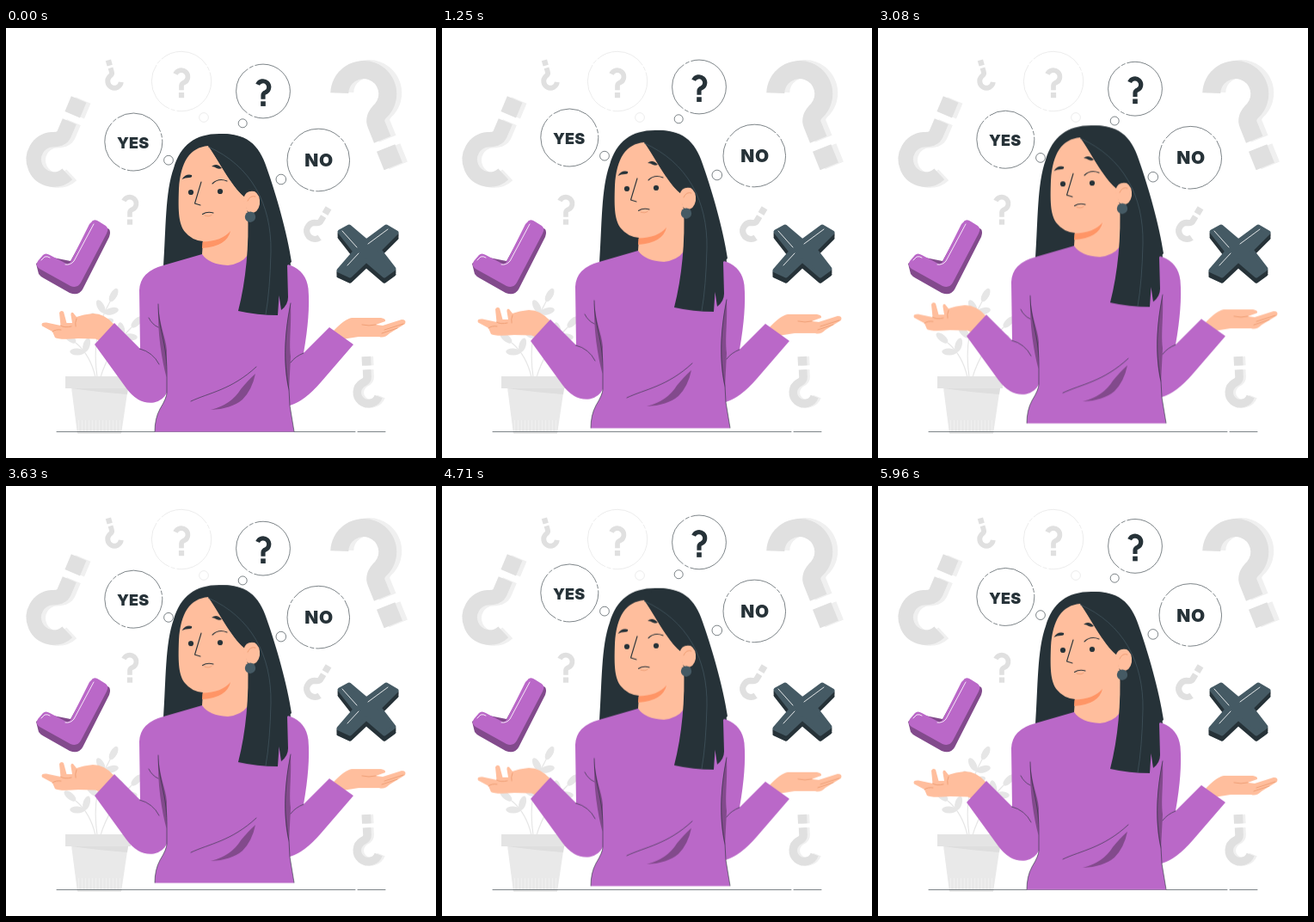
Recreate the animation shown at these times as an HTML page. Size 500 by 500 pixels, loop 6 s.

```html
<!DOCTYPE html>
<html lang="en">
<head>
<meta charset="utf-8">
<title>Yes or no</title>
<style>
  html, body { margin: 0; width: 100%; height: 100%; overflow: hidden; background: #fff; }
  svg { display: block; width: 100vw; height: 100vh; }
  .woman { animation: float 6s linear infinite; }
  .bubbles { animation: bob 6s linear infinite; }
  @keyframes float { 50% { transform: translateY(-10px); } }
  /* half a second of rest, then 3 s swings, cut off by the loop */
  @keyframes bob {
    0%, 8.3333%, 58.3333% { transform: translateY(0); }
    33.3333%, 83.3333% { transform: translateY(-10px); }
    100% { transform: translateY(-3.333px); }
  }
  .ink { fill: #263238; }
  .slate { fill: #455a64; }
  .purple { fill: #ba68c8; }
  .shade { fill: #824a8c; }
  .skin { fill: #ffbe9d; }
  .line { fill: none; stroke: #263238; stroke-width: .6; stroke-linecap: round; stroke-linejoin: round; }
  .feature { stroke-width: 1.1; }
  .crease { fill: none; stroke: #eb996e; stroke-width: .8; stroke-linecap: round; }
  .shine { fill: none; stroke: #fff; stroke-width: 1; stroke-linecap: round; opacity: .85; }
  .ring { fill: #fff; stroke: #263238; stroke-width: .6; stroke-dasharray: 60 2 5 2; }
  .dot { fill: #fff; stroke: #263238; stroke-width: .6; }
  .faint { stroke: #e0e0e0; }
  .grey { color: #e0e0e0; }
  .pale { color: #f0f0f0; }
  .leaf { fill: #e6e6e6; }
  .stems { fill: none; stroke: #e6e6e6; stroke-width: 1.2; }
  text { font: 900 18px Inter, "Open Sans", sans-serif; letter-spacing: .2px; text-anchor: middle; fill: #263238; }
  .large { font-size: 20.8px; letter-spacing: .6px; }
</style>
</head>
<body>
<svg viewBox="0 0 500 500">
  <defs>
    <!-- hook centred on 0,0 with its dot 80 below -->
    <g id="ask">
      <path d="M-26 -11 A28 28 0 1 1 13 25 Q0 30 0 39 V58" fill="none" stroke="currentColor" stroke-width="21"/>
      <path d="M-11.5 68.5h23v23h-23z" fill="currentColor"/>
    </g>
    <path id="cross" stroke-width="5" stroke-linejoin="round"
      d="M388 237 L399 231 L419 248 L442 231 L454 238 L434 258 L451 280 L440 288 L419 270 L400 288 L387 282 L406 260 Z"/>
  </defs>

  <!-- loose question marks -->
  <use href="#ask" class="pale" transform="translate(422 75) rotate(-22)"/>
  <use href="#ask" class="grey" transform="translate(416 76) rotate(-22)"/>
  <use href="#ask" class="pale" transform="translate(60 154) rotate(203) scale(.83)"/>
  <use href="#ask" class="grey" transform="translate(55 153) rotate(203) scale(.83)"/>
  <use href="#ask" class="pale" transform="translate(424 424) rotate(177) scale(.46)"/>
  <use href="#ask" class="grey" transform="translate(421 424) rotate(177) scale(.46)"/>
  <use href="#ask" class="grey" transform="translate(126 62) rotate(164) scale(.28)"/>
  <use href="#ask" class="grey" transform="translate(144 204) scale(.27)"/>
  <use href="#ask" class="grey" transform="translate(359 236) rotate(211) scale(.34)"/>

  <g>
    <circle class="ring faint" cx="204" cy="62" r="34.7"/>
    <circle class="dot faint" cx="230" cy="104" r="5.4"/>
    <use href="#ask" class="grey" transform="translate(204 56.5) scale(.27)"/>
  </g>

  <!-- plant -->
  <g>
    <g class="stems">
      <path d="M106 406 C101 370 106 345 121 318"/>
      <path d="M104 406 Q98 380 81 366"/>
      <path d="M110 406 C117 382 130 364 146 348"/>
    </g>
    <g id="leaves"></g>
    <path d="M76 418 H142 L134 472 H83Z" fill="#e9e9e9"/>
    <path d="M69 405 H145 V419 H69Z" fill="#e4e4e4"/>
    <path d="M76 419 H142 L141 426 Q112 424 76 419Z" fill="#dedede"/>
    <path d="M84 462.5 H134" stroke="#f5f5f5" stroke-width="13" stroke-dasharray=".6 3.4"/>
  </g>
  <path class="line" d="M59 469.5 H406 M409 469.5 H441"/>

  <!-- tick -->
  <path class="shade" d="M35 274 L38 286 Q40 289 44 291 L74 308 Q84 312 89 304 L120 243 Q122 237 120 234 L101 224 L75 271 L45 265Z"/>
  <path class="purple" d="M101 224 Q104 222 108 225 L116 230 Q120 233 117 239 L87 296 Q83 303 75 300 L39 280 Q34 277 37 271 L43 264 Q46 261 51 264 L70 274 Q73 275 75 272 L97 228Z"/>
  <path class="shine" d="M102 228 L79 271 Q75 276 69 275 M41 270 L45 266 Q48 265 51 267"/>

  <!-- cross -->
  <g class="ink" stroke="#263238">
    <use href="#cross" y="2"/>
    <use href="#cross" y="4"/>
    <use href="#cross" y="6.3"/>
  </g>
  <use href="#cross" class="slate" stroke="#455a64"/>
  <path class="shine" d="M391 236 L408 255 M444 234 L421 251 M410 262 L397 276"/>

  <g class="bubbles">
    <circle class="ring" cx="148.3" cy="132.5" r="33.5"/>
    <circle class="ring" cx="299" cy="73.5" r="31.4"/>
    <circle class="ring" cx="363.3" cy="153.5" r="36.3"/>
    <circle class="dot" cx="189" cy="153.7" r="5.4"/>
    <circle class="dot" cx="275.2" cy="110.8" r="5"/>
    <circle class="dot" cx="319.8" cy="176" r="5.8"/>
    <use href="#ask" color="#263238" transform="translate(299 68.5) scale(.245)"/>
    <text x="147.7" y="140.2">YES</text>
    <text class="large" x="364" y="161.200">NO</text>
  </g>

  <g class="woman">
    <path class="ink" d="M248 123 C290 122 298 150 304 168 C315 200 328 245 331 276 L281 272 L228 268 L183 277 C186 235 185 190 195 163 C203 136 220 123 248 123Z"/>

    <!-- hands -->
    <path class="skin" d="M126 345 Q115 332 101 332 Q90 333 82 336 L78 331 Q75 330 75.5 334 L77 343 L70.5 343 L67 330 Q64 327.5 62 331 L63.5 346 L47 342.5 Q40 342 42 346.5 L54 353 L57 360 Q62 363 84 361 L104 361.5 L110 364Z"/>
    <path class="crease" d="M63.5 346 Q68 349 76 347 M54 353 Q58 350 64 351 M82 338 Q80 343 81 347"/>
    <path class="skin" d="M380 353 Q394 338 402 337 L436 337 Q442 338 441 341 L430 345 L438 346 L460 339 Q466 339 464 344 L446 355 Q440 361 434 359 L410 359 L391 362Z"/>
    <path class="crease" d="M430 345 Q422 347 414 345 M462 344 L440 351 M455 349 L437 355"/>

    <!-- jumper -->
    <path class="purple" d="M228 263 L183 276 Q156 283 155 305 L156 373 L126 343 L103 368 L140 419 Q154 438 172 435.5 Q183 433 187 424 Q187 430 179 443 Q173 454 173 469.4 L335 469.4 L330 439 Q347 434 366 412 L404 368 L376 348 L346 378 Q354 333 351.5 303 Q349 283 331 276 L281 264Z"/>
    <path class="shade" d="M177 321 C178 345 186 360 187 375 L186.5 406 C181 385 176 355 177 321Z"/>
    <path class="shade" d="M331 320 C332 350 329 362 331 382 L329 422 C323 400 322 362 331 320Z"/>
    <path class="shade" d="M238 444 Q262 438 273 420 Q282 409 290 402 Q286 421 275 432 Q262 443 238 444Z"/>
    <path class="line" d="M155.5 373 Q171 377 178 391 M166 337 Q170 345 177 348 M177 321 C177 350 187 365 187 400 V424 Q187 430 179 443 Q173 454 173 469 M331 320 C322 365 324 395 329 420 L330 439 L335 469 M346 378 Q336 382 331 389 M215 434 C236 424 262 421 291 394"/>

    <!-- face -->
    <path class="skin" d="M235 137 C214 139 203 155 201 187 C200 215 201 228 208 237 Q216 247 229 248 L228 263 Q236 275 258 276 Q274 274 281 264 L284 200 L277 196 C262 184 245 150 235 137Z"/>
    <path d="M228.5 248.5 Q251 248 261 236 Q257 254 228 256Z" fill="#ff9566"/>
    <path class="ink" d="M204.5 176 Q209 169 216 171 Q217 174 213 174 Q208 174 204.5 176Z M239 161 Q245 156 251 163 Q248 164.500 245 163 Q242 161 239 161Z"/>
    <path class="line feature" d="M240 181 Q247 174 257 178 M227 179 L219.5 204 L226 206 M228.5 216.5 Q234 213 241 215"/>
    <path class="crease" d="M231 218 Q236 220 239 217.5"/>
    <circle class="ink" cx="215" cy="191" r="3.1"/>
    <circle class="ink" cx="249" cy="190" r="3.1"/>

    <!-- front hair, ear -->
    <path class="ink" d="M235 136.500 C245 150 262 184 277 196 L281 215 C283 250 279 295 270 329 Q292 334 316 334 L317.5 311 L320 328 Q328 322 328 313 L327 276 L332 272 C327 238 314 194 305 168 C296 138 283 122 248 123Z"/>
    <path d="M235 138 C285 160 309 205 308 260 Q307 305 302 333" fill="none" stroke="#455a64" stroke-width=".7"/>
    <path class="skin" d="M276 198 Q279 188 289 190 Q296 194 295 205 Q293 216 283 215 L280 212Z"/>
    <path class="crease" d="M281 201 Q284 194 290 196"/>
    <circle class="slate" cx="284" cy="219.7" r="6.2"/>
  </g>
</svg>
<script>
  // Leaves grow in pairs along the upper part of each stem, with one at its tip.
  const gap = 15, spread = 52;
  const leaf = ({ x, y }, turn) =>
    `<ellipse class="leaf" cy="-8.5" rx="4" ry="8.5" transform="translate(${x} ${y}) rotate(${turn})"/>`;

  let leaves = '';
  for (const stem of document.querySelectorAll('.stems path')) {
    const end = stem.getTotalLength();
    for (let at = end; at > end * .4; at -= gap) {
      const p = stem.getPointAtLength(at), q = stem.getPointAtLength(at - 1);
      const turn = Math.atan2(p.x - q.x, q.y - p.y) * 180 / Math.PI;
      leaves += at === end ? leaf(p, turn) : leaf(p, turn - spread) + leaf(p, turn + spread);
    }
  }
  document.getElementById('leaves').innerHTML = leaves;
</script>
</body>
</html>
```
